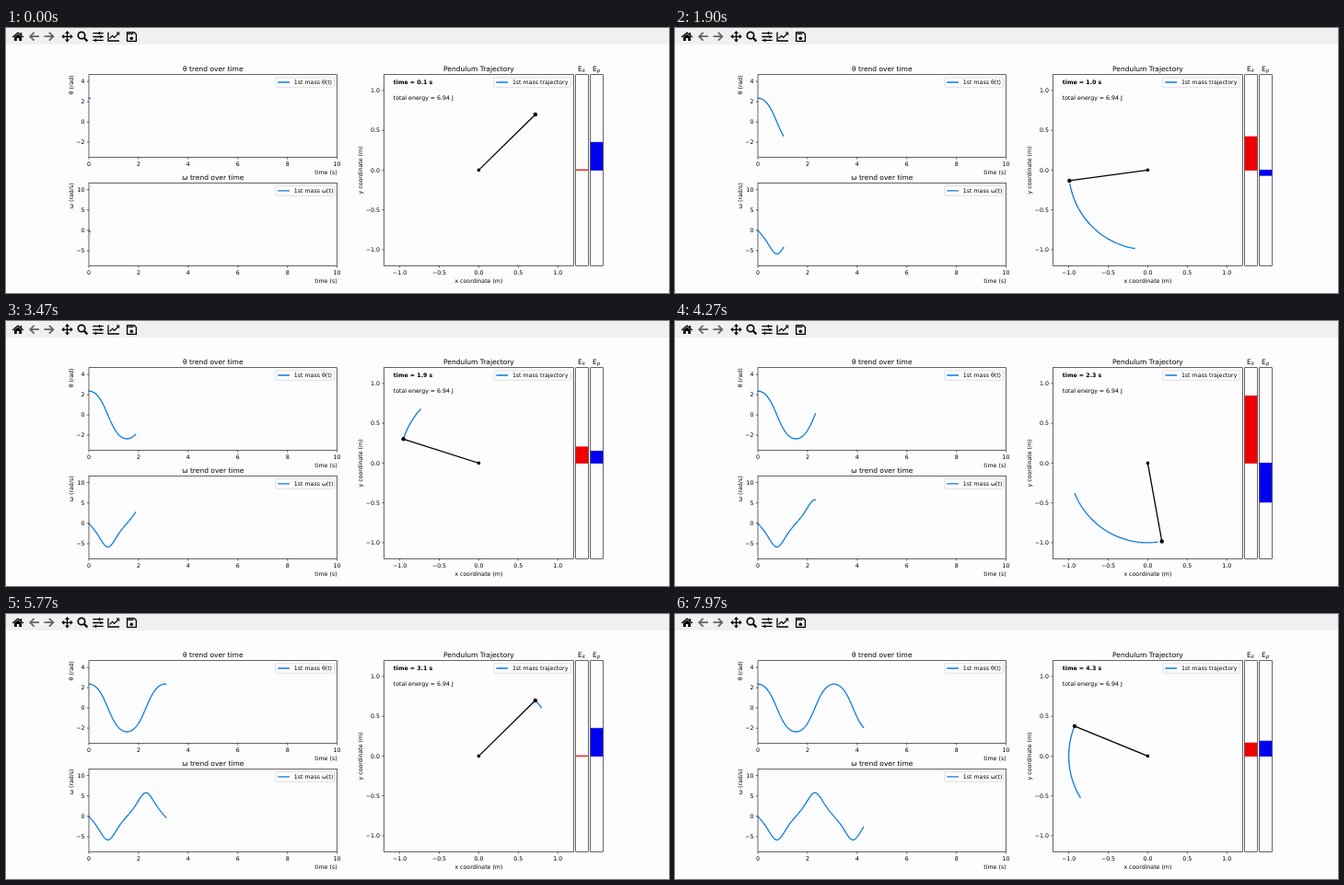
Animation of 720x288 px, one loop 8 s. Source, as an HTML page:

```html
<!DOCTYPE html>
<html lang="en">
<head>
<meta charset="utf-8">
<title>Pendulum simulation</title>
<style>
html, body { margin: 0; width: 100%; height: 100%; overflow: hidden; background: #fdfcfe; }
svg { display: block; }
text { font: 6.25px "DejaVu Sans", sans-serif; text-rendering: geometricPrecision; white-space: pre; }
.title { font-size: 7.5px; }
.bold { font-weight: bold; }
.sub { font-size: 5.25px; font-style: italic; }
.frame { fill: none; stroke: #000; stroke-width: .6; }
.curve { fill: none; stroke: #0a7be2; stroke-width: 1.3; stroke-linejoin: round; stroke-linecap: round; }
.legend { fill: #fefdff; stroke: #ccc; stroke-width: .6; }
.icon { fill: none; stroke: #000; stroke-width: 1.3; }
.nav { fill: none; stroke: #656466; stroke-width: 1.8; }
</style>
</head>
<body>
<svg id="stage" width="720" height="288" viewBox="0 0 720 288">
  <rect width="720" height="18" fill="#f0eff1"/>
  <path d="M7.2 10 13 5l5.8 5" class="icon"/>
  <path d="M9 9.8 13 6.5l4 3.3V14h-2.8v-3h-2.4v3H9zM15.6 5h1.5v3l-1.5-1.3z"/>
  <path d="M36 9.2H26.6M30.6 4.8 26.2 9.2l4.4 4.4M41.5 9.2h9.4M46.9 4.8l4.4 4.4-4.4 4.4" class="nav"/>
  <path d="M61.5 9.3h10M66.5 4.3v10" class="icon" stroke-width="1.6"/>
  <path d="M66.5 3l2.5 3h-5zM66.5 15.6l2.5-3h-5zM60.2 9.3l3-2.5v5zM72.8 9.3l-3-2.5v5z"/>
  <circle cx="82" cy="8" r="3.7" class="icon" style="stroke-width:1.7"/>
  <path d="M84.8 10.8l3.6 3.6" class="icon" style="stroke-width:2.2"/>
  <path d="M94.3 5.6h11.4M94.3 9.5h11.4M94.3 13.3h11.4M101.5 4v3.2M103 7.9v3.2M97.5 11.7v3.2" class="icon"/>
  <path d="M111 4.5V14h12M112.6 11.4l3-3 2 2 4.6-4.6" class="icon"/>
  <path d="M119.6 4.6h3.6v3.6z"/>
  <path d="M131.6 4.6h7.6l2.2 2.2v7.6h-9.8zM132.5 6.4h6" class="icon"/>
  <circle cx="136.3" cy="11.2" r="1.8"/>
</svg>
<script>
const stage = document.getElementById('stage');

function add(tag, attrs, content = '') {
  const node = document.createElementNS('http://www.w3.org/2000/svg', tag);
  for (const name in attrs) node.setAttribute(name, attrs[name]);
  node.textContent = content;
  return stage.appendChild(node);
}
const label = (content, x, y, anchor = 'middle', cls = '') =>
  add('text', { x, y, 'text-anchor': anchor, class: cls }, content);
const rotated = (content, x, y) =>
  label(content, 0, 0).setAttribute('transform', `translate(${x} ${y}) rotate(-90)`);
const path = (cls, d = '') => add('path', { class: cls, d });
const box = (cls, x, y, width, height) => add('rect', { class: cls, x, y, width, height });
const number = (v, digits) => v.toFixed(digits).replace('-', '−');

// Axes: pixel box, pixel position of the origin and pixels per unit.
function makeAxes({ left, right, top, bottom, x0, y0, sx, sy, xTicks, yTicks, digits, title, legend, legendWidth }) {
  const px = x => x0 + x * sx, py = y => y0 - y * sy;
  for (const v of xTicks) {
    path('frame', `M${px(v)} ${bottom}v2.2`);
    label(number(v, digits), px(v), bottom + 9.5);
  }
  for (const v of yTicks) {
    path('frame', `M${left} ${py(v)}h-2.2`);
    label(number(v, digits), left - 4.5, py(v) + 2.3, 'end');
  }
  label(title, (left + right) / 2, top - 3.8, 'middle', 'title');
  const curve = path('curve');
  box('frame', left, top, right - left, bottom - top);
  const legendX = right - 3.1 - legendWidth, legendY = top + 3.1;
  box('legend', legendX, legendY, legendWidth, 10.5).setAttribute('rx', 1.2);
  path('curve', `M${legendX + 2.9} ${legendY + 5.2}h11.8`);
  label(legend, legendX + 20, legendY + 7.4, 'start');
  return { px, py, curve };
}

const trend = { left: 90, right: 359.6, x0: 90, sx: 26.96, xTicks: [0, 2, 4, 6, 8, 10], digits: 0, legendWidth: 63.7 };
const angleAxes = makeAxes({ ...trend, top: 50.7, bottom: 140.4, y0: 102.1, sy: 11,
  yTicks: [-2, 0, 2, 4], title: 'θ trend over time', legend: '1st mass θ(t)' });
const speedAxes = makeAxes({ ...trend, top: 168.6, bottom: 258.4, y0: 219.9, sy: 4.43,
  yTicks: [-5, 0, 5, 10], title: 'ω trend over time', legend: '1st mass ω(t)' });
const units = [-1, -.5, 0, .5, 1];
const space = makeAxes({ left: 410.5, right: 616.4, top: 50.7, bottom: 258.4, x0: 513.4, y0: 154.4,
  sx: 85.8, sy: 86.5, xTicks: units, yTicks: units, digits: 1,
  title: 'Pendulum Trajectory', legend: '1st mass trajectory', legendWidth: 83.4 });

label('time (s)', 359.6, 158.7, 'end');
label('time (s)', 359.6, 276.7, 'end');
label('x coordinate (m)', 513.4, 277);
rotated('θ (rad)', 73.2, 61.8);
rotated('ω (rad/s)', 73.2, 182.3);
rotated('y coordinate (m)', 387.2, 154.5);
const clock = label('', 420.8, 61.1, 'start', 'bold');
label('total energy = 6.94 J', 420.8, 77.5, 'start');

function makeBar(left, letter, color) {
  label('E', left + 4.6, 46.7, 'middle', 'title');
  label(letter, left + 7.2, 48, 'start', 'sub');
  const bar = add('rect', { x: left + .4, width: 12.8, fill: color, stroke: color, 'stroke-width': .8 });
  box('frame', left, 50.7, 13.6, 207.7);
  return value => {
    const height = value * 43.2;
    bar.setAttribute('y', 154.4 - Math.max(height, 0));
    bar.setAttribute('height', Math.abs(height));
  };
}
const setKinetic = makeBar(618.7, 'k', '#ee0000');
const setPotential = makeBar(634.7, 'p', '#0000f2');

const rod = add('path', { stroke: '#000', 'stroke-width': 1.3 });
add('circle', { cx: 513.4, cy: 154.4, r: 1.8 });
const bob = add('circle', { r: 2.2 });

// Swing of a 1 m pendulum released at 135 degrees.
const G = 9.81, DT = .001, START = Math.PI * .75;
const states = [];
for (let i = 0, angle = START, speed = 0; i < 4400; i++) {
  states.push({ time: i * DT, angle, speed });
  const half = speed - G * Math.sin(angle) * DT / 2;
  angle += half * DT;
  speed = half - G * Math.sin(angle) * DT / 2;
}
const indexAt = time => Math.max(0, Math.round(time / DT));

// Simulated seconds reached at a few steps of the uneven playback.
const pace = [[0, .051], [37, .681], [77, 1.389], [128, 2.32], [173, 3.112], [203, 3.641], [239, 4.258]];
function simulatedTime(step) {
  const k = pace.findIndex(p => p[0] >= step) || 1;
  const [a, ta] = pace[k - 1], [b, tb] = pace[k];
  return ta + (tb - ta) * (step - a) / (b - a);
}

function trace(axes, from, to, x, y) {
  const points = [];
  for (let i = from; i <= to; i += Math.min(8, Math.max(1, to - i))) {
    points.push(axes.px(x(states[i])).toFixed(2) + ' ' + axes.py(y(states[i])).toFixed(2));
  }
  axes.curve.setAttribute('d', 'M' + points.join('L'));
}

const LAG = .01, TRAIL = .24, LOOP = 8000;
const bobX = s => Math.sin(s.angle), bobY = s => -Math.cos(s.angle);

function draw(ms) {
  const step = Math.floor((Math.floor(ms / 10) * 10 + 4) * .03);
  const time = simulatedTime(Math.min(step, 239));
  const last = indexAt(time), now = states[indexAt(time + LAG)];
  trace(angleAxes, 0, last, s => s.time, s => s.angle);
  trace(speedAxes, 0, last, s => s.time, s => s.speed);
  trace(space, indexAt(time - TRAIL), last, bobX, bobY);

  const x = space.px(bobX(now)), y = space.py(bobY(now));
  rod.setAttribute('d', `M513.4 154.4L${x} ${y}`);
  bob.setAttribute('cx', x);
  bob.setAttribute('cy', y);
  setKinetic(now.speed ** 2 / (2 * G));
  setPotential(bobY(now));
  clock.textContent = `time = ${time.toFixed(1)} s`;
}

const began = performance.now();
function tick() {
  draw((performance.now() - began) % LOOP);
  requestAnimationFrame(tick);
}
tick();
</script>
</body>
</html>
```
